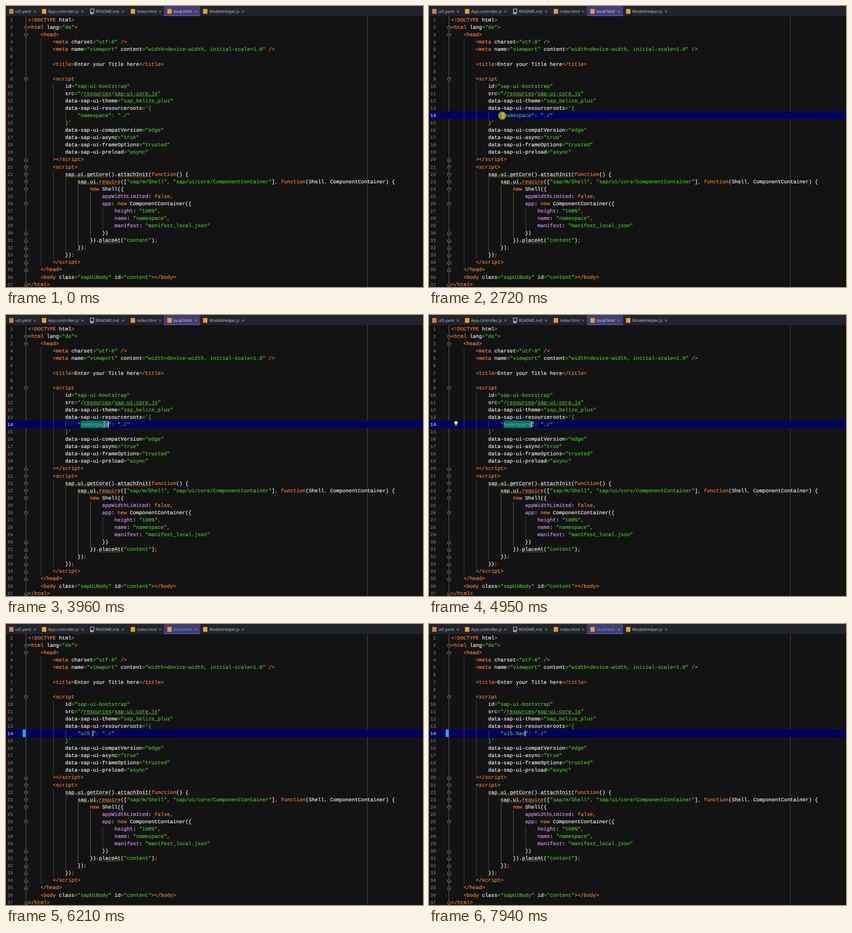
Write an HTML page that moves like this. It is 911x615 px and loops after 8000 ms.

```html
<!DOCTYPE html>
<html lang="en">
<head>
<meta charset="utf-8">
<title>Editor</title>
<style>
  html, body { margin: 0; width: 100%; height: 100%; overflow: hidden; background: #131313; }
  svg { display: block; width: 911px; height: 615px; }
  text { white-space: pre; text-rendering: geometricPrecision; }
  .code { font: 11.22px "Liberation Mono", monospace; stroke-width: .22px; }
  .num { font: 10.3px "Liberation Mono", monospace; fill: #8e8e8e; text-anchor: end; }
  .tab { font: 8.75px "Open Sans", "Noto Sans", sans-serif; fill: #c9ccd4; }
</style>
</head>
<body>
<svg id="stage" viewBox="0 0 911 615"></svg>
<script>
const LOOP = 8000, COL = 6.733, LEFT = 48.5, ROW = 16.07;
const colX = col => LEFT + col * COL;
const rowY = line => 31 + (line - 1) * ROW;
const stage = document.getElementById('stage');
const inks = { o: '#f8803c', g: '#4cc42f', w: '#f4f4f4', p: '#d794f4' };

function add(tag, attrs, parent = stage) {
  const node = document.createElementNS('http://www.w3.org/2000/svg', tag);
  for (const key in attrs) node.setAttribute(key, attrs[key]);
  return parent.appendChild(node);
}
const rect = (x, y, width, height, fill, parent) => add('rect', { x, y, width, height, fill }, parent);
const path = (d, stroke, width = 1, fill = 'none') => add('path', { d, stroke, 'stroke-width': width, fill });
function label(content, x, y, cls) {
  const node = add('text', { x, y, class: cls });
  node.textContent = content;
  return node;
}

// "@o", "@g", "@w" and "@p" switch the ink for the text after them.
const source = String.raw`@o<!DOCTYPE@w html@o>
@o<html @wlang@g="de"@o>
    @o<head>
        @o<meta @wcharset@g="utf-8" @o/>
        @o<meta @wname@g="viewport" @wcontent@g="width=device-width, initial-scale=1.0" @o/>

        @o<title>@wEnter your Title here@o</title>

        @o<script
            @wid@g="sap-ui-bootstrap"
            @wsrc@g="/resources/sap-ui-core.js"
            @wdata-sap-ui-theme@g="sap_belize_plus"
            @wdata-sap-ui-resourceroots@g='{
                @g"namespace": "./"
            @g}'
            @wdata-sap-ui-compatVersion@g="edge"
            @wdata-sap-ui-async@g="true"
            @wdata-sap-ui-frameOptions@g="trusted"
            @wdata-sap-ui-preload@g="async"
        @o></scr@oipt>
        @o<script>
            @wsap.ui.getCore().attachInit(@ofunction@w() {
                @wsap.ui.@orequire@w([@g"sap/m/Shell"@o, @g"sap/ui/core/ComponentContainer"@w]@o, function@w(Shell@o, @wComponentContainer) {
                    @onew @wShell({
                        @pappWidthLimited@w: @ofalse,
                        @papp@w: @onew @wComponentContainer({
                            @pheight@w: @g"100%"@o,
                            @pname@w: @g"namespace"@o,
                            @pmanifest@w: @g"manifest_local.json"
                        @w})
                    @w}).placeAt(@g"content"@w)@o;
                @w})@o;
            @w})@o;
        @o</scr@oipt>
    @o</head>
    @o<body @wclass@g="sapUiBody" @wid@g="content"@o></body>
@o</html>`.split('\n');

// Editor background
rect(0, 0, 911, 615, '#131313');
path('M43.5 22V615', '#686868');
path('M789.5 22V615', '#505050');
const activeRow = rect(0, 231, 911, 16.5, '#000064');

// Indent guides: column, first line, last line, colour
[[4, 4, 34, '#484848'], [8, 10, 19, '#484848'], [8, 22, 33, '#484848'],
 [12, 14, 14, '#484848'], [12, 23, 32, '#484848'], [16, 24, 31, '#747474'],
 [20, 25, 30, '#747474'], [24, 27, 29, '#484848']].forEach(([col, from, to, ink]) => {
  const x = Math.floor(colX(col)) + 1.5;
  path(`M${x} ${rowY(from) - 8}V${rowY(to) + 8}`, ink);
});

const changeBar = rect(36.5, 231, 7, 16.5, '#23a5f0');
const selection = rect(colX(17), 231, 0, 16.5, '#086a86');

let typedLine, activeNumber;
source.forEach((raw, i) => {
  const line = i + 1, y = rowY(line) + 3.1;
  const number = label(line, 15.2, y, 'num');
  const body = raw.trimStart();
  const text = add('text', { x: colX(raw.length - body.length), y, class: 'code' });
  body.split('@').slice(1).forEach(part => {
    const ink = inks[part[0]];
    add('tspan', { fill: ink, stroke: ink }, text).textContent = part.slice(1);
  });
  if (line === 14) { typedLine = text.firstChild; activeNumber = number; }
});

// Inspection underlines: line, column, length
[[11, 18, 9], [11, 28, 14], [22, 12, 14], [22, 29, 10], [23, 16, 14], [31, 23, 7]].forEach(([line, col, len]) => {
  const y = rowY(line) + 6;
  let d = `M${colX(col)} ${y}`;
  for (let k = 1; k * 1.6 <= len * COL; k++) d += `L${colX(col) + k * 1.6} ${y + (k % 2 ? -1.3 : 0)}`;
  path(d, '#9b8428', .9);
  if (line === 11) path(`M${colX(col)} ${y - 1.2}h${len * COL}`, '#3e9c2a', .7);
});

// Fold markers
function fold(line, dir) {
  const y = rowY(line) + .6 + .4 * dir;
  path(`M40.5 ${y - 3.5 * dir}h7v${4.5 * dir}l-3.5 ${3 * dir}l-3.5 ${-3 * dir}z`, '#8c8c8c', .9, '#131313');
  path(`M42.2 ${y - .6 * dir}h3.6`, '#a0a0a0', .9);
}
[2, 3, 9, 21, 22, 23, 24, 26].forEach(line => fold(line, 1));
[20, 30, 31, 32, 33, 34, 35, 37].forEach(line => fold(line, -1));

// Tab bar: title, text x, close x, icon colour
rect(0, 0, 911, 22, '#21242d');
rect(345, 0, 79, 22, '#443c75');
rect(345, 20, 79, 2, '#5c53a8');
const tabs = [
  ['ui5.yaml', 20.5, 63, '#c9814a'], ['App.controller.js', 92, 167, '#e8a22c'],
  ['README.md', 196, 256, null], ['index.html', 286, 336.5, '#e59a45'],
  ['local.html', 366, 415, '#e59a45'], ['ModelsHelper.js', 444, 518, '#e8a22c']
].map(([title, x, close, icon]) => {
  if (icon) rect(x - 13.5, 6.5, 9.5, 10.5, icon);
  else path('M184.5 6.5h7.5v7.5h-7.5zM184.5 14v2.5h2M189.5 16.5h2.5M186.5 14v3.5l1.5 -1l1.5 1v-3.5', '#dcdcdc', 1.2);
  path(`M${close - 2.5} 9.5l5 5m0 -5l-5 5`, '#a2a5ad', .9);
  return label(title, x, 15.2, 'tab');
});

// Overlays
const bulb = add('g', {});
add('circle', { cx: 59, cy: 235.8, r: 3.7, fill: '#f5d84e' }, bulb);
rect(57.2, 239.2, 3.6, 1.2, '#d8d8d8', bulb);
rect(57.7, 241, 2.6, 1.2, '#d8d8d8', bulb);
const caret = rect(0, 233, 1.4, 13, '#ffffff');
const halo = add('circle', { r: 9, fill: '#c8c800', 'fill-opacity': .7 });
const pointer = path('M-2 -5.2h1.4l.6 .6l.6 -.6h1.4M0 -4.6v9.2M-2 5.2h1.4l.6 -.6l.6 .6h1.4', '#e6e6e6', .9);

// Pointer moves: start, end, steps, from x, y, to x, y
const moves = [
  [960, 1260, 5, 675, 495, 208, 317], [1490, 1970, 7, 203, 316, 152, 241],
  [2110, 2340, 4, 153, 241, 160, 241], [2720, 3490, 11, 160, 240, 215, 239],
  [4180, 4490, 5, 217, 239, 227, 239]
];
const typing = [[0, 'namespace'], [5180, 'u'], [5270, 'ui'], [5830, 'ui5'], [6210, 'ui5.'],
  [7310, 'ui5.b'], [7550, 'ui5.ba'], [7940, 'ui5.bas']];
const latest = (table, t) => table.filter(entry => entry[0] <= t).pop();
const show = (node, on) => node.setAttribute('visibility', on ? 'visible' : 'hidden');

function pointerAt(t) {
  const move = latest(moves, t);
  if (!move) return null;
  const [start, end, steps, x0, y0, x1, y1] = move;
  const step = Math.min(steps - 1, Math.floor((t - start) / (end - start) * (steps - 1) + 1e-6));
  const p = step / (steps - 1), ease = p * p * (3 - 2 * p);
  return [x0 + (x1 - x0) * ease, y0 + (y1 - y0) * ease];
}

function selectedChars(t, x) {
  if (t >= 3490) return 9;
  return Math.max(0, Math.ceil((x - colX(17)) / COL));
}

function render(t) {
  const edited = t >= 5180, clicked = t >= 2720;
  const [, word] = latest(typing, t);
  const content = `"${word}": "./"`;
  if (typedLine.textContent !== content) typedLine.textContent = content;

  const pos = pointerAt(t);
  show(pointer, pos && !edited);
  if (pos) {
    pointer.setAttribute('transform', `translate(${pos})`);
    halo.setAttribute('cx', pos[0]);
    halo.setAttribute('cy', pos[1]);
  }
  show(halo, clicked && t < 3960);
  halo.setAttribute('opacity', Math.min(1, Math.max(0, (3960 - t) / 300)));

  const selected = clicked && !edited ? selectedChars(t, pos[0]) : 0;
  selection.setAttribute('width', selected * COL);
  caret.setAttribute('x', colX(17 + (edited ? word.length : selected)) - .7);

  show(caret, clicked);
  show(activeRow, clicked);
  activeNumber.style.fill = clicked ? '#ffffff' : '';
  show(bulb, t >= 4950 && !edited);
  show(changeBar, edited);
  tabs[4].style.fill = edited ? '#45c3f5' : '#e2e2ea';
}

function tick() {
  render(performance.now() % LOOP);
  requestAnimationFrame(tick);
}
tick();
</script>
</body>
</html>
```
